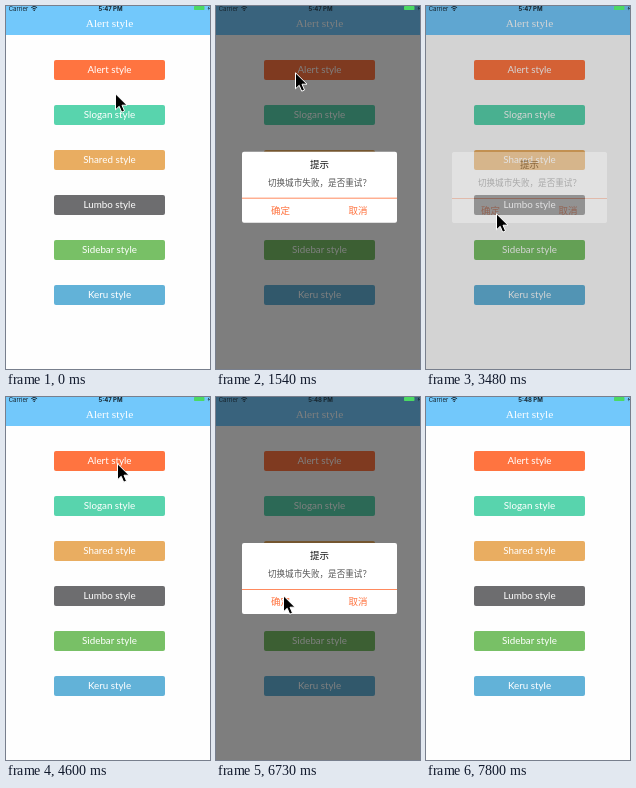
An HTML page for the animation above (9150 ms loop, 204 by 363 pixels).

```html
<!DOCTYPE html>
<html lang="zh-CN">
<head>
<meta charset="utf-8">
<title>Alert style</title>
<style>
html, body { margin: 0; width: 100%; height: 100%; overflow: hidden; background: #fefefe; }
svg { display: block; width: 100%; height: 100%; }
text { text-anchor: middle; }
.title { font: 11.3px "Liberation Serif", serif; fill: #fff; }
.item { font: 9.8px Lato, sans-serif; fill: #fff; }
.status { font: 6px Inter, sans-serif; fill: #16222a; }
.zh { font: 9.5px "Noto Sans CJK SC", "Noto Sans CJK", sans-serif; fill: #ff7440; }
.zh .head { font-weight: 500; fill: #111; }
.zh .msg { font-size: 8.6px; fill: #555; }
</style>
</head>
<body>
<svg viewBox="0 0 204 363">
  <rect width="204" height="363" fill="#fefefe"/>
  <rect width="204" height="29" fill="#72c8fb"/>
  <text class="title" x="103.5" y="21">Alert style</text>
  <g id="menu"></g>
  <rect id="shade" width="204" height="363" opacity="0"/>
  <g id="dialog" class="zh" opacity="0">
    <rect x="26" width="155" height="71" rx="2" fill="#fff"/>
    <text class="head" x="103.5" y="16.3">提示</text>
    <text class="msg" x="103.5" y="34.4">切换城市失败，是否重试？</text>
    <rect id="rule" x="26" y="46" width="155" height="1" fill="#ff8a5e"/>
    <text x="64.5" y="62">确定</text>
    <text x="142" y="62">取消</text>
  </g>
  <g class="status">
    <text x="12.5" y="4.7">Carrier</text>
    <g fill="none" stroke="#16222a">
      <path d="M25.3 1.6Q28.2 -.9 31.1 1.6M26.6 3Q28.2 1.6 29.8 3"/>
    </g>
    <circle cx="28.2" cy="4.3" r=".8"/>
    <text id="clock" x="104.5" y="4.7" font-weight="700">5:47 PM</text>
    <rect x="188" y="0" width="10.5" height="4" rx=".8" fill="#4cd964"/>
    <path d="M203.4 0L201.6 2.4H202.8L202.2 4.4L204 1.9H202.9Z"/>
  </g>
  <path id="cursor" d="M.5 .8V16.8L4.2 13.3L6.7 19.2L9.5 18L7 12.2H12Z" stroke="#fff" stroke-width="1"/>
</svg>
<script>
const LOOP = 9150, STEP = 60, REST = 146, DROP = 218;
const $ = id => document.getElementById(id);
const [menu, shade, dialog, rule, clock, cursor] =
  ["menu", "shade", "dialog", "rule", "clock", "cursor"].map($);

menu.innerHTML = [
  ["Alert", "#ff7440"], ["Slogan", "#58d4ad"], ["Shared", "#e9ad61"],
  ["Lumbo", "#6d6d6f"], ["Sidebar", "#78c066"], ["Keru", "#62b2d8"]
].map(([name, color], i) => `
  <rect x="48" y="${54 + 45 * i}" width="111" height="20" rx="2" fill="${color}"/>
  <text class="item" x="103.5" y="${66.9 + 45 * i}">${name} style</text>`).join("");

// start, end, steps, then from, bend and to points
const moves = [
  [60, 470, 8, [109, 87], [95, 76], [79, 66]],
  [1700, 1880, 4, [79, 66], [81, 70], [83, 73]],
  [1940, 2470, 10, [83, 73], [134, 130], [70, 207]],
  [3960, 4600, 12, [70, 207], [139, 140], [111, 66]],
  [5900, 6070, 4, [111, 66], [114, 72], [116, 79]],
  [6130, 6730, 11, [116, 79], [150, 130], [67, 198]],
  [7440, 7800, 7, [67, 198], [136, 205], [206, 212]]
];

const alerts = [
  { open: 1010, lag: 79, close: 3420, gone: 3540, steps: 3 },
  { open: 5200, lag: 36, close: 7440, gone: 7800, steps: 7 }
];

function stepped(t, start, end, n) {
  if (t < start) return 0;
  if (t >= end) return 1;
  return (Math.floor((t - start) / (end - start) * (n - 1)) + 1) / n;
}

const ease = p => p * p * (3 - 2 * p);

// Underdamped spring falling in from above
function spring(ms) {
  const s = ms / 1000, decay = 8.5, freq = 14.72;
  return -DROP * Math.exp(-decay * s) *
    (Math.cos(freq * s) + decay / freq * Math.sin(freq * s));
}

function pointer(t) {
  const [start, end, n, a, b, c] = moves.findLast(m => t >= m[0]) || moves[0];
  const p = ease(stepped(t, start, end, n)), q = 1 - p;
  return a.map((v, i) => q * q * v + 2 * p * q * b[i] + p * p * c[i]);
}

function draw(t) {
  const alert = alerts.find(a => t >= a.open && t < a.gone);
  let alpha = 0, dark = 0;
  if (alert) {
    const age = Math.floor((t - alert.open) / STEP) * STEP + alert.lag;
    alpha = 1 - stepped(t, alert.close, alert.gone, alert.steps);
    dark = 0.5 * alpha * Math.min(1, age / 130);
    dialog.setAttribute("transform", `translate(0 ${(REST + spring(age)).toFixed(2)})`);
    rule.setAttribute("opacity", age < 150 ? 0 : 1);
  }
  dialog.setAttribute("opacity", alpha);
  shade.setAttribute("opacity", dark);
  cursor.setAttribute("transform", `translate(${pointer(t).map(v => v.toFixed(2))})`);
  clock.textContent = t >= 5800 ? "5:48 PM" : "5:47 PM";
}

const begin = performance.now();
function tick() {
  draw((performance.now() - begin) % LOOP);
  requestAnimationFrame(tick);
}
tick();
</script>
</body>
</html>
```
